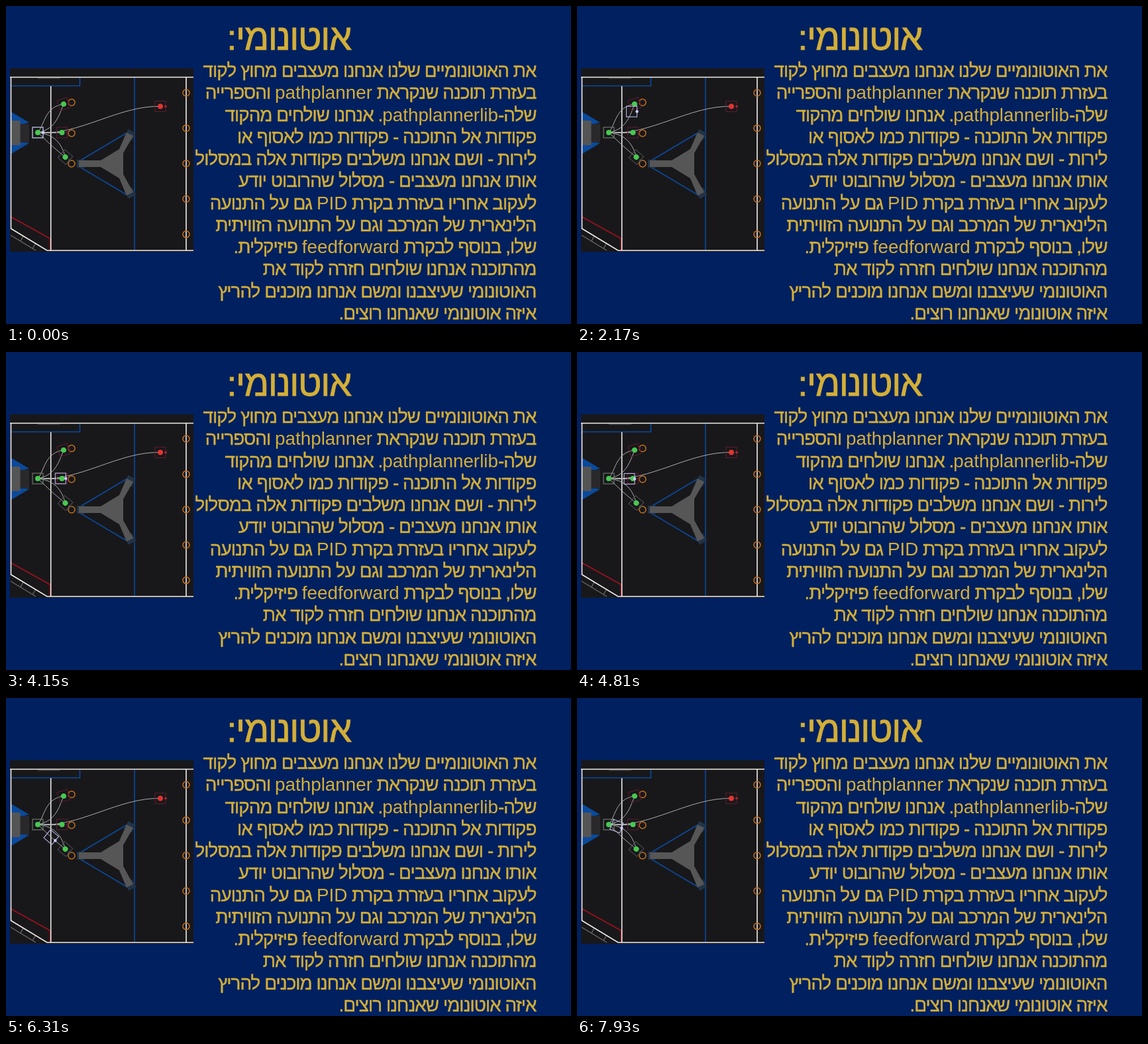
An HTML page that plays this animation: 853 px wide and 480 px high, repeating every 7.99 s.

```html
<!DOCTYPE html>
<html lang="he">
<head>
<meta charset="utf-8">
<title>אוטונומי</title>
<style>
  html, body { margin: 0; width: 100%; height: 100%; overflow: hidden; background: #002060; }
  svg { display: block; width: 100%; height: 100%; }
  text {
    font-family: "Liberation Sans", Arial, sans-serif;
    fill: #d4af37; stroke: #d4af37; stroke-width: 0.015em;
    direction: rtl; letter-spacing: -0.034em;
  }
  .title { letter-spacing: -0.026em; }
  .latin { letter-spacing: 0; stroke: none; }
  .line { fill: none; stroke-width: 1.6; }
  .white { stroke: #f2eee8; }
  .blue { stroke: #0a4a9c; }
  .red { stroke: #a0101c; }
  .gray { stroke: #6c6c6c; stroke-width: 1.2; }
</style>
</head>
<body>
<svg viewBox="0 0 853 480">
  <rect width="853" height="480" fill="#002060"/>
  <text class="title" x="427" y="66" font-size="54.5" text-anchor="middle">אוטונומי:</text>
  <g id="copy" font-size="27.8"></g>

  <rect x="6" y="94" width="277" height="277" fill="#18181b"/>
  <g id="field">
    <path d="M8 160L35 176L22 179V205L35 207L8 223Z" fill="#0a4a9c"/>
    <rect x="21" y="178" width="14" height="28" fill="#29292c"/>
    <rect x="8" y="173" width="13.5" height="37" fill="#555"/>
    <path class="line blue" d="M7 120.5H111.500V108M194 108V369"/>
    <path class="line blue" d="M184 190.500L109 235V241.500L184 286"/>
    <g fill="#223347">
      <rect x="181" y="188" width="13" height="13" transform="rotate(30 187 194)"/>
      <rect x="181" y="276" width="13" height="13" transform="rotate(-30 187 282)"/>
      <rect x="107" y="232" width="12" height="12"/>
    </g>
    <path d="M110 233H143L171 216L182 191L192 196L177 222V254L192 281L182 286L171 260L143 243H110Z" fill="#565656"/>
    <path class="line red" d="M7 318L66.500 351V369"/>
    <path class="line white" d="M67.700 121V369M272 108V369"/>
    <path class="line gray" d="M7 346L45 369M26 347L22 355M45 358L40 366"/>
    <path class="line white" d="M6 107.500H283M7.500 107V336L62 369H283"/>
    <path class="line gray" d="M48 109H82"/>
  </g>
  <g id="paths" fill="none" stroke="#bdbdbd" stroke-width="0.9"></g>
  <g id="marks"></g>
  <g id="robot" stroke="#c4c4f4" fill="none">
    <rect x="-8" y="-8" width="16" height="16"/>
    <circle cx="8" r="2.2" fill="#ccccff" stroke="none"/>
  </g>
</svg>
<script>
const LOOP = 7990, STEP = 60;
const $ = id => document.getElementById(id);

function add(parent, tag, attrs) {
  const el = document.createElementNS("http://www.w3.org/2000/svg", tag);
  for (const k in attrs) el.setAttribute(k, attrs[k]);
  return parent.appendChild(el);
}

const copy = [
  "את האוטונומיים שלנו אנחנו מעצבים מחוץ לקוד",
  "בעזרת תוכנה שנקראת pathplanner והספרייה",
  "שלה-pathplannerlib. אנחנו שולחים מהקוד",
  "פקודות אל התוכנה - פקודות כמו לאסוף או",
  "לירות - ושם אנחנו משלבים פקודות אלה במסלול",
  "אותו אנחנו מעצבים - מסלול שהרובוט יודע",
  "לעקוב אחריו בעזרת בקרת PID גם על התנועה",
  "הלינארית של המרכב וגם על התנועה הזוויתית",
  "שלו, בנוסף לבקרת feedforward פיזיקלית.",
  "מהתוכנה אנחנו שולחים חזרה לקוד את",
  "האוטונומי שעיצבנו ומשם אנחנו מוכנים להריץ",
  "איזה אוטונומי שאנחנו רוצים."
];
copy.forEach((s, i) => {
  const line = add($("copy"), "text", { x: 800.5, y: 107 + i * 33.27 });
  for (const part of s.split(/([a-z]+)/i)) {
    if (/[a-z]/i.test(part)) add(line, "tspan", { class: "latin" }).textContent = part;
    else line.append(part);
  }
});

// Notes on the field
const ring = (cx, cy) =>
  add($("marks"), "circle", { cx, cy, r: 5, fill: "none", stroke: "#c4701c", "stroke-width": 1.5 });
[145.5, 192, 238].forEach(y => ring(99, y));
for (let i = 0; i < 5; i++) ring(272, 131 + i * 53.4);

// Waypoints: robot outline, heading dot, centre
function waypoint(x, y, angle, edge, dot) {
  const g = add($("marks"), "g", { transform: `translate(${x} ${y}) rotate(${angle})` });
  add(g, "rect", { x: -8, y: -8, width: 16, height: 16, fill: "none", stroke: edge });
  add(g, "circle", { cx: 8, r: 1.8, fill: edge });
  add(g, "circle", { r: 4, fill: dot });
  return g;
}
const GREEN = "#48c850", RED = "#e03430", DIM = "#5c1c2c";
waypoint(87, 148, -18, DIM, GREEN);
waypoint(84.5, 191, 0, DIM, GREEN);
waypoint(89.5, 228, 40, "#505050", GREEN);
waypoint(48, 191, 0, "#788878", GREEN);
const goal = waypoint(233, 151.5, 0, DIM, RED);
add(goal, "circle", { cx: 8, r: 1.8, fill: "#b02430" });

// start, end, path, heading from, heading to, share of the path spent turning
const legs = [
  [250, 1690, "M48 191C58 180 58 152 87 148", 0, -20, 0, 0.5],
  [1740, 3110, "M87 148C78 172 72 186 48 191", -20, 0, 0, 0.18],
  [3200, 4350, "M48 191Q66 190 84.500 191", 0, 0, 0, 1],
  [4510, 5610, "M84.500 191Q66 192.500 48 191", 0, 0, 0, 1],
  [5650, 6970, "M48 191C57 199 69 212 89.500 228", 0, 40, 0, 0.45],
  [7030, 8350, "M89.500 228C84 208 74 194 48 191", 40, 0, 0.6, 1]
].map(([start, end, d, from, to, turn0, turn1]) => {
  const path = add($("paths"), "path", { d });
  return { start, end, path, length: path.getTotalLength(), from, to, turn0, turn1 };
});
add($("paths"), "path", { d: "M48 191C110 196 170 150 233 151.500" });

const clamp = v => Math.max(0, Math.min(1, v));
// Constant acceleration, then constant braking
const drive = u => u < 0.5 ? 2 * u * u : 1 - 2 * (1 - u) * (1 - u);

function render(t) {
  const leg = legs.filter(l => l.start <= t).pop() || legs[0];
  const s = drive(clamp((t - leg.start) / (leg.end - leg.start)));
  const p = leg.path.getPointAtLength(s * leg.length);
  const turn = clamp((s - leg.turn0) / (leg.turn1 - leg.turn0));
  const angle = leg.from + (leg.to - leg.from) * turn;
  $("robot").setAttribute("transform", `translate(${p.x} ${p.y}) rotate(${angle})`);
}

function tick() {
  const t = performance.now() % LOOP;
  render(Math.max(0, Math.floor((t - 10) / STEP) * STEP + 10));
  requestAnimationFrame(tick);
}
tick();
</script>
</body>
</html>
```
